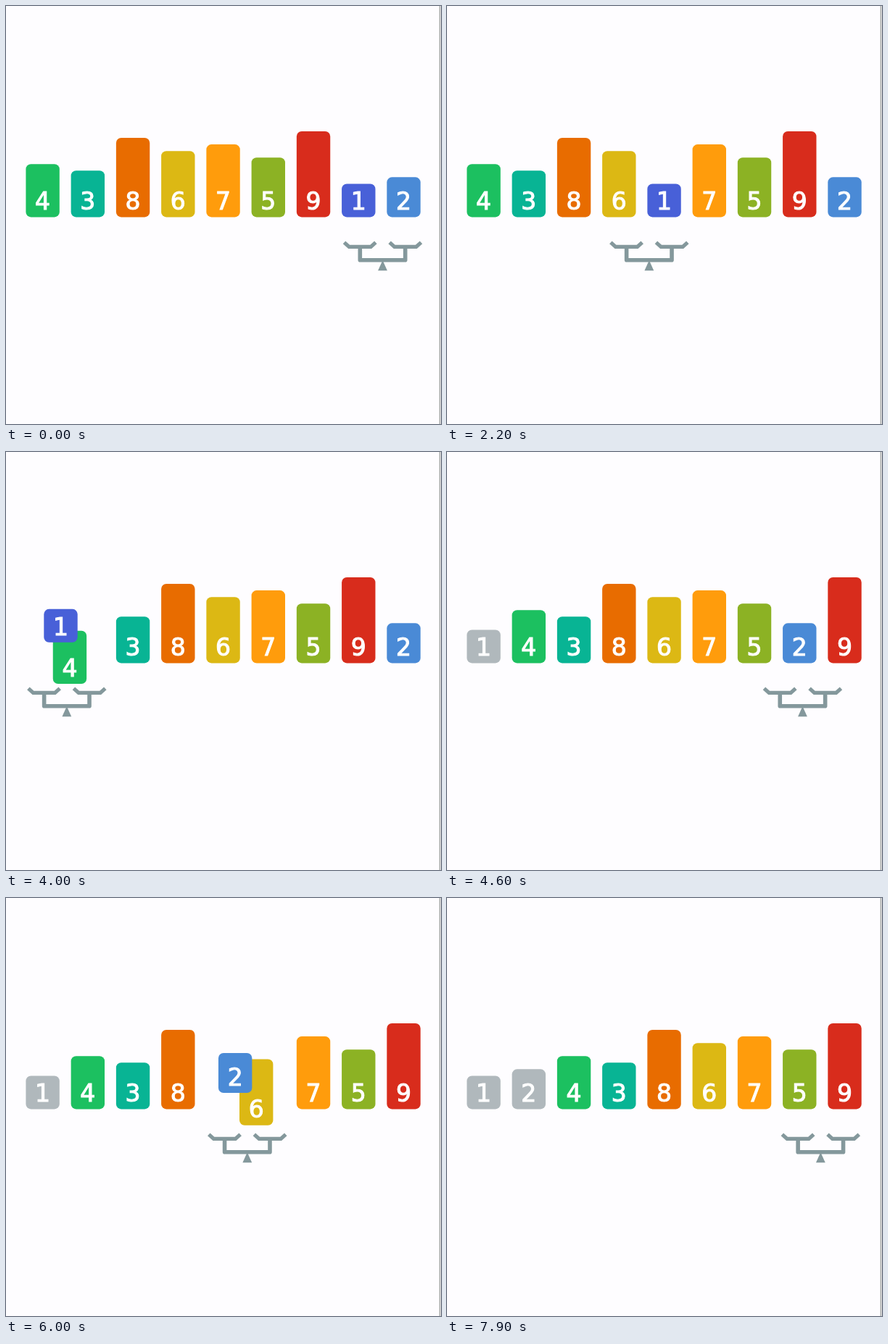
An HTML page that plays this animation: 600 by 577 pixels, repeating every 8000 ms.

```html
<!DOCTYPE html>
<html lang="en">
<head>
<meta charset="utf-8">
<title>Bubble sort</title>
<style>
  html, body { margin: 0; width: 100%; height: 100%; overflow: hidden; background: #fefdff; }
  svg { display: block; width: 100vw; height: 100vh; }
  text { font: 33px "DejaVu Sans", Verdana, sans-serif; fill: #fff; stroke: #fff; stroke-width: 1.1; text-anchor: middle; }
</style>
</head>
<body>
<svg viewBox="0 0 600 577" xmlns="http://www.w3.org/2000/svg">
  <rect x="597.6" width="1.7" height="577" fill="#a8aaa9"/>
  <g id="blocks"></g>
  <g id="scale" fill="none" stroke="#84989c" stroke-width="5.2">
    <path d="M-53 326.3L-46.3 332.4H-16.3L-9.6 326.3M9.6 326.3L16.3 332.4H46.3L53 326.3"/>
    <path d="M-31.2 332V350.8H31.2V332" stroke-width="5.6" stroke-linejoin="round"/>
    <path d="M0 351L6.4 365.2H-6.4Z" fill="#84989c" stroke="none"/>
  </g>
</svg>
<script>
const LOOP = 8000, TICK = 100;
const STEP = 16, MOVE = 15;            // in 1/60 s
const FIRST_X = 50.6, GAP = 62.24, FLOOR = 291.4, WIDTH = 46.4, LIFT = 30;
const START = [4, 3, 8, 6, 7, 5, 9, 1, 2];
const COLORS = ['#4860d8', '#4a8ad6', '#08b494', '#1cc060', '#8cb224', '#dcb814', '#ff9c0c', '#e86c00', '#d82c1c'];
const SORTED = '#b0b8bc';

const swaps = [];   // {at, left}
const shifts = [];  // scale travel {at, to, jump}
const sortedAt = {};

// Carries one value leftwards, swapping at each pair from `from` down to `to`.
function carry(value, at, from, to) {
  for (let left = from; left >= to; left--) {
    swaps.push({ at, left });
    at += STEP;
    if (left > to) shifts.push({ at, to: left - 1 });
    else sortedAt[value] = at;
    at += STEP;
  }
}

shifts.push({ at: 23, to: 6 });
carry(1, 39, 6, 0);
shifts.push({ at: 253, to: 7, jump: true });
carry(2, 253, 7, 1);
shifts.push({ at: 469, to: 7, jump: true }, { at: 473, to: 6 });

const layer = document.getElementById('blocks');
const scale = document.getElementById('scale');

function add(parent, tag, attrs) {
  const node = document.createElementNS('http://www.w3.org/2000/svg', tag);
  for (const key in attrs) node.setAttribute(key, attrs[key]);
  return parent.appendChild(node);
}

const blocks = COLORS.map((color, i) => {
  const group = add(layer, 'g');
  const height = 46 + 9.05 * i;
  const box = add(group, 'rect', { x: -WIDTH / 2, y: -height, width: WIDTH, height, rx: 7 });
  add(group, 'text', { x: 0, y: -10.3 }).textContent = i + 1;
  return { group, box, color };
});

const progress = (tick, at) => Math.min(1, Math.max(0, (tick - at) / MOVE));

function place(value, slot, dy) {
  blocks[value - 1].group.setAttribute('transform', `translate(${FIRST_X + GAP * slot} ${FLOOR + dy})`);
}

function render(ms) {
  const tick = Math.floor(ms / TICK) * TICK * 60 / 1000;
  const order = START.slice();
  let active = null;
  for (const { at, left } of swaps) {
    const p = progress(tick, at);
    if (p === 1) [order[left], order[left + 1]] = [order[left + 1], order[left]];
    else if (p > 0) active = { left, p };
  }
  order.forEach((value, slot) => place(value, slot, 0));
  if (active) {
    const { left, p } = active;
    const dy = LIFT * Math.sin(Math.PI * p);
    place(order[left], left + p, dy);
    place(order[left + 1], left + 1 - p, -dy);
    layer.appendChild(blocks[order[left + 1] - 1].group);
  }
  blocks.forEach(({ box, color }, i) => {
    box.setAttribute('fill', tick >= sortedAt[i + 1] ? SORTED : color);
  });

  let pair = 7;
  for (const { at, to, jump } of shifts) {
    if (tick >= at) pair += (to - pair) * (jump ? 1 : progress(tick, at));
  }
  scale.setAttribute('transform', `translate(${519.5 - GAP * (7 - pair)} 0)`);
}

const begin = performance.now();
function loop() {
  render((performance.now() - begin) % LOOP);
  requestAnimationFrame(loop);
}
render(0);
requestAnimationFrame(loop);
</script>
</body>
</html>
```
